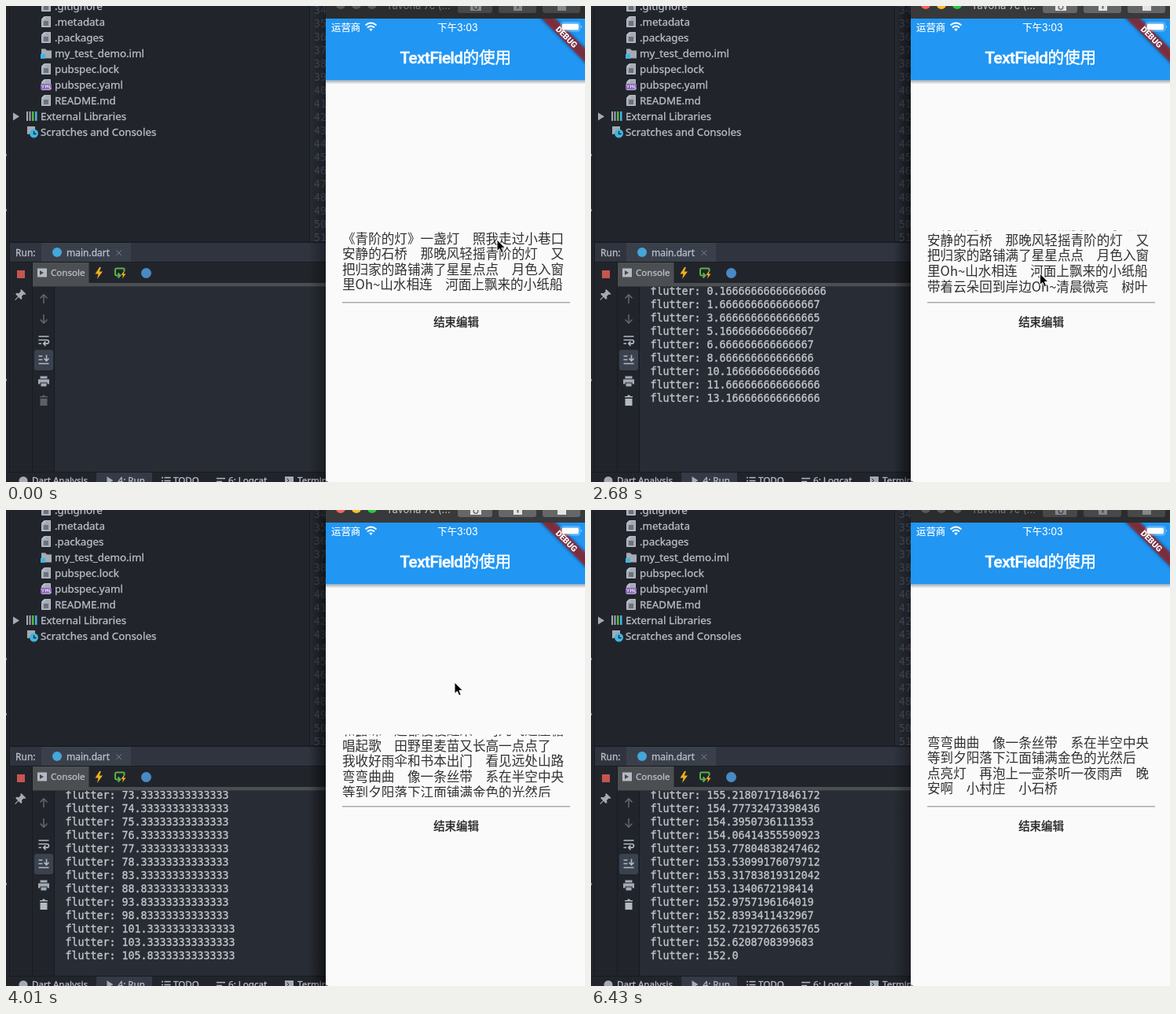
Recreate the animation shown at these times as an HTML page. Size 737 px wide and 605 px high, loop 6530 ms.

```html
<!DOCTYPE html>
<html lang="zh">
<head>
<meta charset="utf-8">
<title>TextField scroll demo</title>
<style>
  html, body { margin: 0; width: 100%; height: 100%; overflow: hidden; background: #21252b; }
  svg { display: block; }
  text { white-space: pre; }
  .ui { font: 12px "Noto Sans", "Open Sans", sans-serif; fill: #b9bec8; stroke: #b9bec8; stroke-width: .3; }
  .tree { font-size: 13.35px; }
  .small { font-size: 11.6px; }
  .mono { font: 13.29px "DejaVu Sans Mono", monospace; }
  .log { fill: #c3c5c9; stroke: #c3c5c9; stroke-width: .35; }
  .app { font: 12.4px Inter, "Noto Sans CJK SC", sans-serif; fill: #fff; stroke: #fff; stroke-width: .2; }
  .title { font: 500 20.6px Roboto, "Noto Sans CJK SC", sans-serif; stroke-width: .5; }
  .body { font: 16.6px "Noto Sans CJK SC", sans-serif; fill: #303030; }
  .button { font: 14.45px "Noto Sans CJK SC", sans-serif; fill: #222; stroke: #222; stroke-width: .35; }
  .icon { fill: #a4abb5; }
  .line { fill: none; stroke: #b4bac3; stroke-width: 1.6; }
  .dim { stroke: #60656d; }
  #bar { --bar: #2b2c2e; --btn: #46484a; --ink: #85878a; --r: #56585b; --y: #56585b; --g: #56585b; }
  #bar.on { --bar: #38393b; --btn: #656668; --ink: #e4e4e4; --r: #ff5f57; --y: #febc2e; --g: #28c840; }
</style>
</head>
<body>
<svg width="737" height="605" viewBox="0 0 737 605">
  <defs>
    <g id="doc">
      <path fill="#a4abb5" d="M4 0H11V13H0V4H4ZM0 3L3 0V3Z"/>
      <path stroke="#353b44" d="M2.5 6.5h6M2.5 8.5h6M2.5 10.5h6"/>
    </g>
    <linearGradient id="side"><stop offset="0" stop-opacity="0"/><stop offset="1" stop-opacity=".55"/></linearGradient>
    <linearGradient id="drop" x2="0" y2="1"><stop offset="0" stop-opacity=".32"/><stop offset="1" stop-opacity="0"/></linearGradient>
    <filter id="blur" x="-20%" y="-100%" width="140%" height="300%"><feGaussianBlur stdDeviation="2"/></filter>
    <clipPath id="logBox"><rect x="62" y="357" width="345" height="235"/></clipPath>
    <clipPath id="field"><rect x="420" y="285.5" width="310" height="79.5"/></clipPath>
    <clipPath id="screen"><path d="M407 16H737V605H412Q407 605 407 600Z"/></clipPath>
  </defs>

  <!-- IDE panels -->
  <rect width="737" height="605" fill="#21252b"/>
  <rect x="387" width="20" height="300" fill="#282c34"/>
  <path fill="#181b20" d="M4 0h1v592h-1zM386 0h1v300h-1zM5 299.5h402v1.5h-402z"/>
  <path fill="#8c929b" d="M0 188h1v3h-1zM0 258h1v3h-1zM0 474h1v3h-1z"/>
  <rect x="5" y="301" width="402" height="24.5" fill="#2f343f"/>
  <rect x="45" y="301" width="114" height="24.5" fill="#3a404b"/>
  <rect x="62" y="357" width="345" height="235" fill="#282c34"/>
  <path fill="#181b20" d="M5 325h402v1h-402zM33 326h1v266h-1zM61 357h1v235h-1zM0 592h407v1h-407z"/>
  <path fill="#4c4f52" d="M34 326H105.5V352H407V356.5H34Z"/>
  <rect x="115" y="593" width="71" height="12" fill="#343a46"/>

  <g id="tree" class="ui tree"></g>
  <g id="gutter" class="mono" fill="#4b5363"></g>

  <!-- tree icons -->
  <path class="icon" d="M9 135.5L17 140.5L9 145.5ZM45 54.5h5l2 2h6v10h-13z"/>
  <rect x="44" y="61" width="6" height="6" fill="#40b6e0"/>
  <rect x="44" y="99" width="14" height="7" fill="#8a63b8"/>
  <path stroke="#e5dcf0" fill="none" d="M45.5 100.500l1.5 2v2m0-2l1.5-2M50.5 104.5v-4l1.5 2l1.5-2v4M55.5 100.5v4h2"/>
  <path class="icon" d="M26 134h2v12h-2zM29.5 134h2v12h-2z"/>
  <rect x="33" y="134" width="2.5" height="12" fill="#62b543"/>
  <rect x="37" y="134" width="2.5" height="12" fill="#40b6e0"/>
  <path class="icon" d="M27 153h10v5h-3l-5 5h-2z"/>
  <circle cx="35.5" cy="162" r="5.5" fill="#40b6e0"/>
  <path d="M35.5 159v3.5h3" fill="none" stroke="#21252b" stroke-width="1.3"/>

  <!-- run header -->
  <g class="ui">
    <text x="12" y="318">Run:</text>
    <text x="77" y="318">main.dart</text>
    <text x="57" y="343.3" class="small">Console</text>
  </g>
  <circle cx="65" cy="313" r="6" fill="#45a6d8"/>
  <path d="M140.5 310.5l6.500 6.5m0-6.5l-6.500 6.5" stroke="#7c828c"/>
  <rect x="40" y="333.5" width="12" height="11" fill="#b4bac3"/>
  <path d="M43 336l5 3l-5 3z" fill="#45484b"/>
  <path d="M119 332L113.5 340.5H117.5L116 347L123 337.5H118.8L121 332Z" fill="#f4af1c"/>
  <path d="M150.5 337v-2.5q0-1-1-1h-8.5q-2 0-2 2v5q0 2 2 2h4m-2.5-3l3 3l-3 3" fill="none" stroke="#59b24a" stroke-width="2"/>
  <path d="M150 337l-3.500 5h2.5l-1 4.5l4.500-6h-2.8l1.3-3.5z" fill="#f4af1c"/>
  <circle cx="178.5" cy="339.5" r="6.5" fill="#4a8ac4"/>

  <!-- run tools -->
  <rect x="14" y="336" width="10" height="10" fill="#c75450"/>
  <path class="icon" d="M19.5 360l6 6l-1.5 1l-1.5-.5l-2.5 2.5l.5 3l-1.5 1l-3-3l-4 4l-.8-.8l4-4l-3-3l1-1.5l3 .5l2.5-2.5l-.5-1.5z"/>
  <path class="line dim" d="M48 378v-11m-4.5 4.5l4.5-4.5l4.5 4.5M48 392v11m-4.5-4.5l4.5 4.5l4.5-4.5"/>
  <path class="line" d="M41.5 420h13M41.5 424.5h10.5q2.5 0 2.5 2.3t-2.5 2.3h-4m2.5-2.8l-2.8 2.8l2.8 2.8M41.5 429h3.5"/>
  <rect x="36" y="437" width="24" height="26" rx="3" fill="#3b424f"/>
  <path class="line" d="M41.5 445h5M41.5 449.5h5M41.5 454.5h13M51.5 443.5v7.5m-3-3l3 3l3-3"/>
  <path class="icon" d="M43.5 470.5h9v3h-9zM41 474.5h14v6h-2.5v-2h-9v2h-2.5zM44.5 479.5h7v4h-7z"/>
  <path id="trash" d="M43 496h3l1-1.5h2l1 1.5h3v1.5h-10zM43.5 499h9v9h-9z"/>

  <!-- bottom strip -->
  <g class="ui small">
    <text x="33" y="607">Dart Analysis</text>
    <text x="142.5" y="607">4: Run</text>
    <text x="213" y="607">TODO</text>
    <text x="283" y="607">6: Logcat</text>
    <text x="371" y="607">Terminal</text>
  </g>
  <circle cx="22" cy="603.5" r="5.5" class="icon"/>
  <path class="icon" d="M128.5 598l8 5l-8 5zM355 598h11v10h-11z"/>
  <path d="M357.5 600.5l2.5 2.5l-2.5 2.5" stroke="#21252b" fill="none"/>
  <path class="line" d="M198 599.5h2m1.5 0h8M198 603.5h2m1.5 0h8M268 600.5h11M268 604.5h7"/>

  <g id="log" class="mono log" clip-path="url(#logBox)"></g>

  <!-- phone window -->
  <rect id="shade" x="385" width="22" height="605" fill="url(#side)"/>
  <g id="bar">
    <rect x="407" width="330" height="16" fill="var(--bar)"/>
    <circle cx="426" cy="-2" r="6" fill="var(--r)"/>
    <circle cx="446" cy="-2" r="6" fill="var(--y)"/>
    <circle cx="466" cy="-2" r="6" fill="var(--g)"/>
    <text x="484" y="3.5" fill="var(--ink)" style="font:13px Inter,sans-serif" opacity=".8">Tavona 7c (...</text>
    <path fill="var(--btn)" d="M575 0h44v6q0 3-3 3h-38q-3 0-3-3zM627 0h48v6q0 3-3 3h-42q-3 0-3-3zM683 0h48v6q0 3-3 3h-42q-3 0-3-3z"/>
    <path fill="var(--ink)" d="M591 0h14v6h-14zM646 0h11v6h-11zM702 0h11v6h-11z"/>
    <circle cx="598" cy="1.5" r="2.8" fill="var(--ink)" stroke="var(--btn)" stroke-width="1.3"/>
    <path d="M651.5 0v3.5" stroke="var(--btn)" stroke-width="2"/>
  </g>
  <g clip-path="url(#screen)">
    <rect x="407" y="16" width="330" height="589" fill="#fafafa"/>
    <rect x="407" y="94.4" width="330" height="5" fill="url(#drop)"/>
    <rect x="407" y="16" width="330" height="78.4" fill="#2196f3"/>
    <g class="app">
      <text x="414" y="31.5">运营商</text>
      <text x="575" y="31.5" text-anchor="middle">下午3:03</text>
      <text x="501.5" y="73.3" class="title"><tspan letter-spacing="-.5">TextField</tspan>的使用</text>
    </g>
    <g fill="none" stroke="#fff" stroke-width="2">
      <path d="M457.5 24.5q7-6 14 0M460 27.5q4.5-4 9 0"/>
      <path d="M464.5 32l-2.3-2.5q2.3-1.8 4.600 0z" fill="#fff" stroke="none"/>
    </g>
    <g transform="translate(737 16) scale(1.031) rotate(45)">
      <rect x="-42" y="26" width="84" height="12" opacity=".5" filter="url(#blur)"/>
      <rect x="-42" y="26" width="84" height="12" fill="#b71c1c" fill-opacity=".627"/>
      <text y="35.7" text-anchor="middle" fill="#fff" style="font:900 10.2px Roboto,sans-serif">DEBUG</text>
    </g>
    <rect x="706" y="21" width="24.5" height="11" rx="2.5" fill="none" stroke="#fff" stroke-opacity=".45"/>
    <rect x="707.5" y="22.5" width="21.5" height="8" rx="1.5" fill="#fff"/>
    <path d="M732 24.5q2 2 0 4z" fill="#fff" opacity=".6"/>
    <g clip-path="url(#field)"><g id="verse" class="body"></g></g>
    <rect x="428" y="376.3" width="290" height="1.1" fill="#8f8f8f"/>
    <text x="573" y="407.3" text-anchor="middle" class="button">结束编辑</text>
  </g>
  <path id="cursor" fill="#000" stroke="#fff" d="M0 0V14.5L3.3 11.5L5.7 16.8L8.2 15.7L5.9 10.5H10.4Z"/>
</svg>

<script>
const $ = id => document.getElementById(id);

function addText(parent, x, y, text = '') {
  const el = document.createElementNS('http://www.w3.org/2000/svg', 'text');
  el.setAttribute('x', x);
  el.setAttribute('y', y);
  el.textContent = text;
  return parent.appendChild(el);
}

function addDoc(y) {
  const el = document.createElementNS('http://www.w3.org/2000/svg', 'use');
  el.setAttribute('href', '#doc');
  el.setAttribute('stroke-width', 1);
  el.setAttribute('transform', `translate(45.5 ${y})`);
  $('tree').appendChild(el);
}

const files = ['.gitignore', '.metadata', '.packages', 'my_test_demo.iml',
  'pubspec.lock', 'pubspec.yaml', 'README.md', 'External Libraries', 'Scratches and Consoles'];
files.forEach((name, i) => {
  if (i < 7 && i !== 3) addDoc(i * 20 - 6.5);
  addText($('tree'), i < 7 ? 62 : 44, i * 20 + 4.8, name);
});
for (let n = 34; n <= 51; n++) addText($('gutter'), 392, 9.5 + (n - 34) * 17, n);

const verse = [
  '《青阶的灯》一盏灯　照我走过小巷口',
  '安静的石桥　那晚风轻摇青阶的灯　又',
  '把归家的路铺满了星星点点　月色入窗',
  '里Oh~山水相连　河面上飘来的小纸船',
  '带着云朵回到岸边Oh~清晨微亮　树叶',
  '和露珠一起都慢慢醒来　鸟儿飞过屋檐',
  '唱起歌　田野里麦苗又长高一点点了',
  '我收好雨伞和书本出门　看见远处山路',
  '弯弯曲曲　像一条丝带　系在半空中央',
  '等到夕阳落下江面铺满金色的光然后',
  '点亮灯　再泡上一壶茶听一夜雨声　晚',
  '安啊　小村庄　小石桥'
];
verse.forEach((line, i) => addText($('verse'), 428, 301.6 + i * 19.6, line));

// Linear interpolation between key points [position, ...values]
function sample(keys, k) {
  const i = keys.findIndex(key => key[0] > k);
  if (i === 0) return keys[0].slice(1);
  if (i < 0) return keys[keys.length - 1].slice(1);
  const a = keys[i - 1], b = keys[i];
  const f = (k - a[0]) / (b[0] - a[0]);
  return a.slice(1).map((v, j) => v + (b[j + 1] - v) * f);
}

// Scroll offset by log row: dragged by hand, then an overdamped spring back to the limit.
const LIMIT = 152, RELEASE = 61, LAST = 91;
const drag = [[0, 0], [13, 21.5], [25, 36], [27, 36.5], [40, 73], [45, 78], [49, 98.5],
  [56, 114.5], [RELEASE, 157]];

function offsetAt(row) {
  if (row <= RELEASE) return sample(drag, row)[0];
  if (row >= LAST) return LIMIT;
  const n = row - RELEASE - 9;
  return LIMIT + 12.81 * Math.exp(-0.15125 * n) - 1.79 * Math.exp(-0.3673 * n);
}

function logLine(row) {
  let v = offsetAt(row);
  if (row <= RELEASE) {
    v = Math.round(v * 2) / 2;   // touch moves come in half pixels
    v += v < 72 ? 1 / 6 : v < 114 ? 1 / 3 : 0;
  }
  return 'flutter: ' + (Number.isInteger(v) ? v.toFixed(1) : v);
}

const LOOP = 6530, TICK = 148.3;
const pointer = [[4, 625, 297], [6, 600, 313], [9, 600, 313], [13, 581, 308], [17, 574, 349],
  [21, 564, 313], [27, 571, 219], [30, 569, 296], [32, 566, 250], [36, 674, 569], [37, 700, 640]];
const printed = [[16, -3], [21, 25], [27, 52], [30, 55], [32, 62.65], [36, 82.35], [38, LAST]];
const LEAD = 2;   // the field runs ahead of the console by this many rows

const rows = Array.from({ length: 16 }, () => addText($('log'), 75.5, 0));

function drawLog(k, pos) {
  const lagging = k > 30 && k < 38;   // during the fling rows sit between lines
  const whole = Math.floor(pos);
  const bottom = lagging ? pos : whole;
  const end = Math.min(LAST, lagging ? whole + 2 : whole);
  const first = Math.max(0, whole - 13);
  rows.forEach((el, r) => {
    const row = first + r;
    el.textContent = row <= end ? logLine(row) : '';
    el.setAttribute('y', 570.8 + 17 * (row - Math.max(bottom, 12)));
  });
  $('trash').setAttribute('fill', pos < 0 ? '#5b6068' : '#b4bac3');
}

function draw(t) {
  const k = Math.floor((t + 1) / TICK);
  const [pos] = sample(printed, k);
  const active = k >= 9 && t < 6430;
  $('bar').classList.toggle('on', active);
  $('shade').setAttribute('opacity', active ? 1 : 0.6);
  $('cursor').setAttribute('transform', `translate(${sample(pointer, k)})`);
  $('verse').setAttribute('transform', `translate(0 ${-1.031 * offsetAt(pos + LEAD)})`);
  drawLog(k, pos);
}

const start = performance.now();
function frame() {
  draw((performance.now() - start) % LOOP);
  requestAnimationFrame(frame);
}
frame();
</script>
</body>
</html>
```
